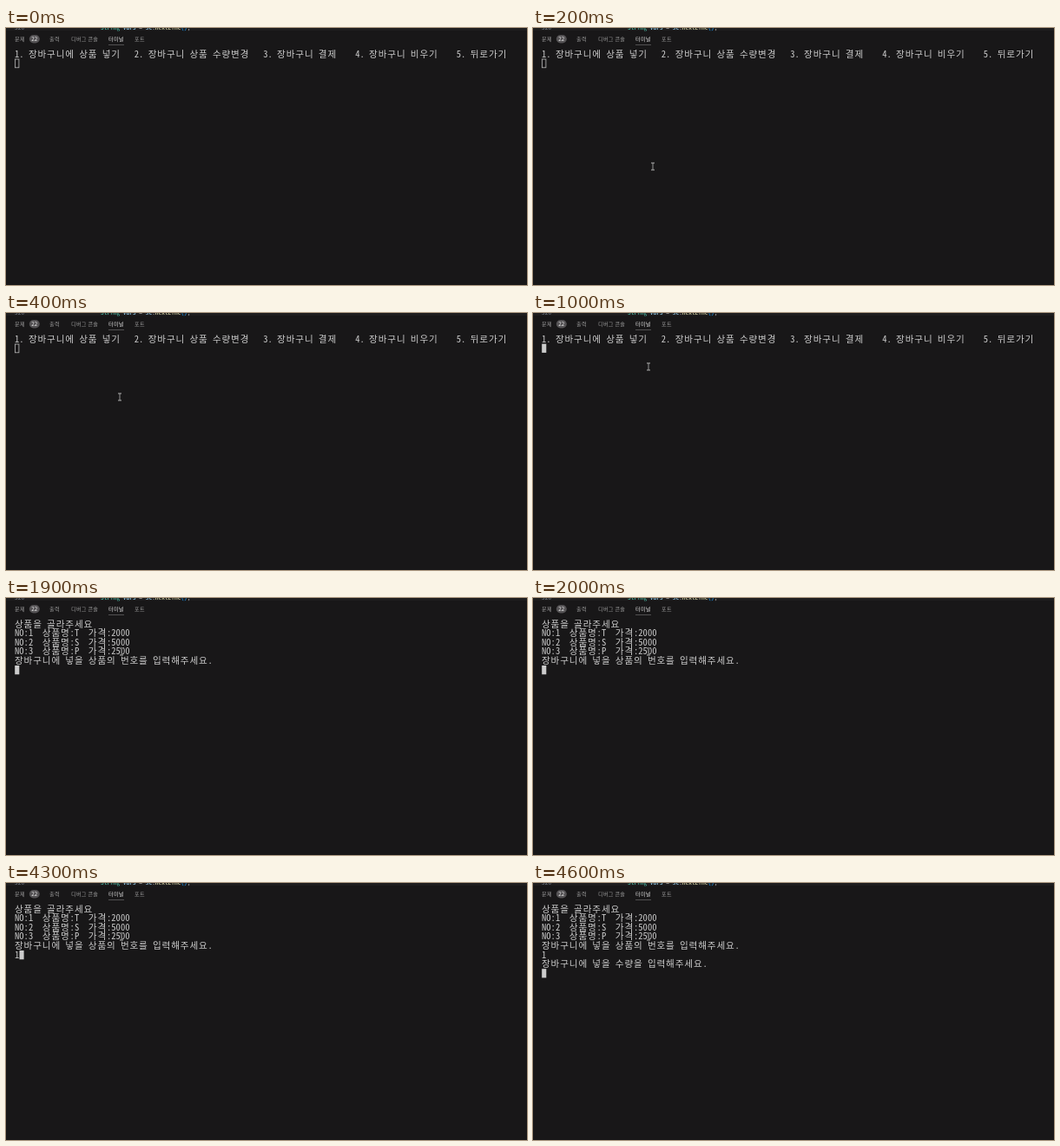
An HTML page with a canvas that plays this animation: 600 by 297 pixels, repeating every 5000 ms.

```html
<!DOCTYPE html>
<html lang="ko">
<head>
<meta charset="utf-8">
<style>
  html, body { margin: 0; width: 100%; height: 100%; overflow: hidden; background: #181718; }
  canvas { display: block; }
</style>
</head>
<body>
<canvas id="stage"></canvas>
<script>
const LOOP = 5000, W = 600, H = 297, CELL = 5.3, LEFT = 10, TOP = 25, ROW = 10.6;
const BACKGROUND = '#181718', MUTED = '#9d9d9d';
const MONO = '"Noto Sans Mono CJK KR", "Noto Sans CJK KR", "Noto Sans CJK", monospace';
const SANS = '"Noto Sans CJK KR", "Noto Sans CJK", sans-serif';

const canvas = document.getElementById('stage');
const ratio = window.devicePixelRatio || 1;
canvas.width = W * ratio;
canvas.height = H * ratio;
canvas.style.width = W + 'px';
canvas.style.height = H + 'px';
const ctx = canvas.getContext('2d');
ctx.scale(ratio, ratio);

const menu = ['1. 장바구니에 상품 넣기   2. 장바구니 상품 수량변경   3. 장바구니 결제    4. 장바구니 비우기    5. 뒤로가기'];
const products = [
  '상품을 골라주세요',
  'NO:1  상품명:T  가격:2000',
  'NO:2  상품명:S  가격:5000',
  'NO:3  상품명:P  가격:2500',
  '장바구니에 넣을 상품의 번호를 입력해주세요.'
];

// The last line of each screen is the one holding the cursor.
const screens = [
  [0, [...menu, '']],
  [1700, [...menu, '1']],
  [1900, [...products, '']],
  [4300, [...products, '1']],
  [4600, [...products, '1', '장바구니에 넣을 수량을 입력해주세요.', '']]
];
const mousePath = [[100, 146, 208], [200, 138, 160], [300, 133, 122], [400, 131, 97], [500, 132, 75], [600, 133, 62]];

const latest = (steps, t) => steps.filter(step => step[0] <= t).pop();

function rect(x, y, w, h, color) {
  ctx.fillStyle = color;
  ctx.fillRect(x, y, w, h);
}

function label(text, x, y, size, color, family = SANS) {
  ctx.font = `${size}px ${family}`;
  ctx.fillStyle = color;
  ctx.fillText(text, x, y);
  return x + ctx.measureText(text).width;
}

// Hangul takes two terminal cells, everything else one.
function terminalLine(text, row) {
  let x = LEFT;
  for (const char of text) {
    label(char, x, TOP + row * ROW + 8.6, 10.6, '#cccccc', MONO);
    x += char >= '가' ? CELL * 2 : CELL;
  }
  return x;
}

function drawCode() {
  rect(0, 0, W, 3, '#1e1d1e');
  ctx.save();
  ctx.beginPath();
  ctx.rect(0, 0, W, 3.4);
  ctx.clip();
  label('526', 10, 2.2, 7.4, '#6e7681', MONO);
  let x = 109;
  for (const [text, color] of [['String ', '#4ec9b0'], ['var5 ', '#9cdcfe'], ['= ', '#d4d4d4'],
    ['sc', '#9cdcfe'], ['.', '#d4d4d4'], ['nextLine', '#dcdcaa'], ['()', '#179fff'], [';', '#d4d4d4']]) {
    x = label(text, x, 2.2, 7.4, color, MONO);
  }
  ctx.restore();
}

function drawTabs() {
  ctx.letterSpacing = '0.3px';
  for (const [text, x, color] of [['문제', 10, MUTED], ['출력', 50, MUTED], ['디버그 콘솔', 75, MUTED],
    ['터미널', 118, '#e0e0e0'], ['포트', 148, MUTED]]) {
    label(text, x, 14.6, 6.1, color);
  }
  ctx.letterSpacing = '0px';
  rect(118, 19, 18, 0.6, '#777777');
  ctx.fillStyle = '#555355';
  ctx.beginPath();
  ctx.roundRect(26.8, 8, 12, 9.4, 4.7);
  ctx.fill();
  label('22', 29.3, 15, 6.2, '#f0f0f0');
}

function drawCursor(x, row, focused) {
  const y = TOP + row * ROW;
  if (focused) return rect(x + 0.2, y, CELL - 0.2, ROW - 0.3, '#cccccc');
  ctx.strokeStyle = '#bbbbbb';
  ctx.lineWidth = 0.8;
  ctx.strokeRect(x + 0.4, y + 0.4, CELL - 0.8, ROW - 0.8);
}

// The pointer inverts whatever lies under it.
function drawMouse([, x, y]) {
  ctx.save();
  ctx.globalCompositeOperation = 'difference';
  ctx.strokeStyle = '#c8c8c8';
  ctx.lineWidth = 0.8;
  ctx.beginPath();
  for (const end of [y - 4, y + 4]) {
    ctx.moveTo(x - 2, end);
    ctx.lineTo(x + 2, end);
  }
  ctx.moveTo(x, y - 4);
  ctx.lineTo(x, y + 4);
  ctx.stroke();
  ctx.restore();
}

function draw(now) {
  const t = now % LOOP;
  rect(0, 0, W, H, BACKGROUND);
  drawCode();
  drawTabs();
  const lines = latest(screens, t)[1];
  let end = LEFT;
  lines.forEach((line, row) => { end = terminalLine(line, row); });
  drawCursor(end, lines.length - 1, t >= 600);
  const mouse = latest(mousePath, t);
  if (mouse) drawMouse(mouse);
  requestAnimationFrame(draw);
}
requestAnimationFrame(draw);
</script>
</body>
</html>
```
